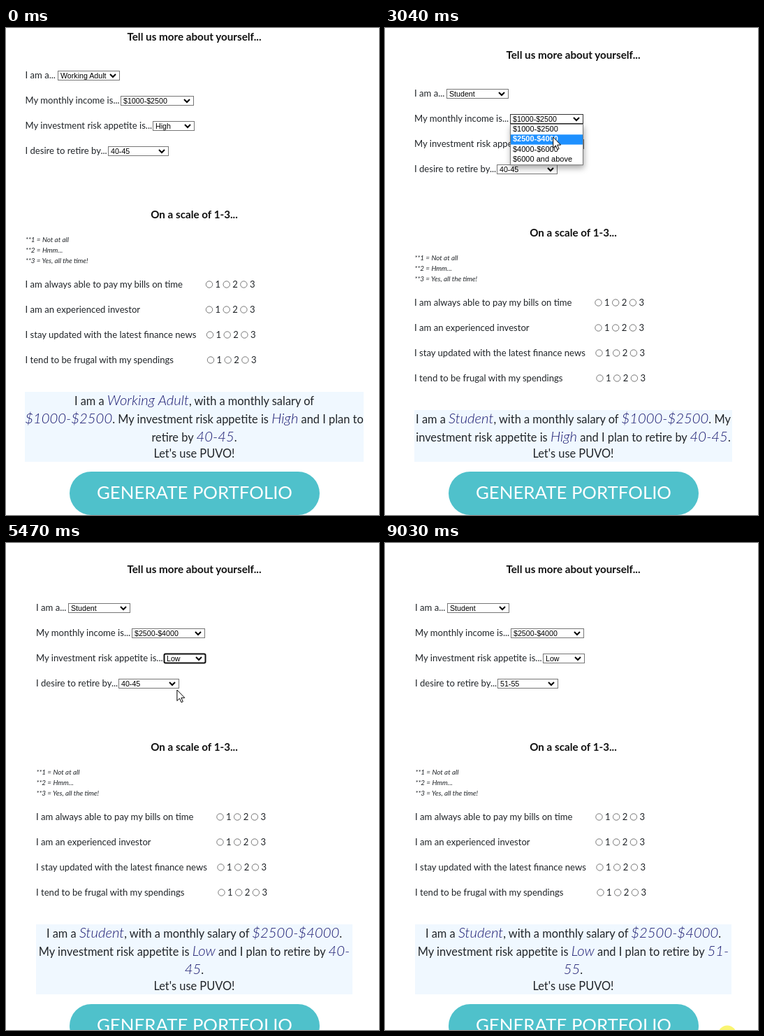
Recreate the animation shown at these times as an HTML page. Size 534 by 696 pixels, loop 9110 ms.

```html
<!DOCTYPE html>
<html lang="en">
<head>
<meta charset="utf-8">
<title>Portfolio form</title>
<style>
html, body { margin: 0; height: 100%; overflow: hidden; background: #fff; }
svg { display: block; width: 534px; height: 696px; font-family: Lato, sans-serif; fill: #212529; }
.head { font-size: 15.2px; font-weight: 700; text-anchor: middle; fill: #111; }
.label { font-size: 13.1px; }
.note { font-size: 9.9px; font-style: italic; }
.sum { font-size: 16.4px; text-anchor: middle; }
.sum tspan { font-size: 20.3px; font-style: italic; font-weight: 300; fill: #191970; }
.button { font-size: 25.8px; text-anchor: middle; fill: #fff; }
.value, .item { font: 10.67px "Liberation Sans", Arial, sans-serif; fill: #000; }
.item { font-size: 11px; }
.hot { font-weight: 700; fill: #fff; }
.menu { fill: #fff; stroke: #767676; filter: drop-shadow(1px 4px 4px rgba(0, 0, 0, .35)); }
</style>
</head>
<body>
<svg id="stage" viewBox="0 0 534 696"></svg>
<script>
const LOOP = 9110, CLICK_AWAY = 9030, PITCH = 36, ROW = 14.3;
const stage = document.getElementById('stage');

// grip: where across the menu the pointer rests; reach, open, close: times; choose: span of the move to the pick
const fields = [
  { label: 'I am a...', x: 74, w: 88, grip: .4, options: ['Working Adult', 'Student', 'Retiree'],
    pick: 1, reach: 470, open: 900, choose: [950, 1490], close: 1750 },
  { label: 'My monthly income is...', x: 164.5, w: 104, grip: .54, options: ['$1000-$2500', '$2500-$4000', '$4000-$6000', '$6000 and above'],
    pick: 1, reach: 2080, open: 2500, choose: [2600, 3300], close: 3360 },
  { label: 'My investment risk appetite is...', x: 210.5, w: 59, grip: .33, options: ['High', 'Medium', 'Low', 'Unsure'],
    pick: 2, reach: 3960, open: 4240, choose: [4770, 5050], close: 5270 },
  { label: 'I desire to retire by...', x: 146, w: 86, grip: .49, options: ['40-45', '46-50', '51-55', '55 and above'],
    pick: 2, reach: 5470, open: 5800, choose: [5950, 6480], close: 6880 }
];
const questions = [
  'I am always able to pay my bills on time',
  'I am an experienced investor',
  'I stay updated with the latest finance news',
  'I tend to be frugal with my spendings'
];
const notes = ['**1 = Not at all', '**2 = Hmm...', '**3 = Yes, all the time!'];

const text = (cls, x, y, s) => `<text class="${cls}" x="${x}" y="${y}">${s}</text>`;
const rect = (x, y, w, h, rest) => `<rect x="${x}" y="${y}" width="${w}" height="${h}" ${rest}/>`;
const em = s => `<tspan>${s}</tspan>`;

// The summary's wrapping decides the page's offset and the button's place
function layoutAt(t) {
  if (t < fields[0].close) return { dx: 0, dy: 0, left: 27, top: 520, button: 634 };
  if (t < fields[2].close) return { dx: 14.5, dy: 26, left: 42, top: 546, button: 634 };
  return { dx: 15.5, dy: 25, left: 43, top: 545, button: 659 };
}

const boxAt = (i, { dx, dy }) => [Math.floor(fields[i].x + dx), 61 + PITCH * i + dy];

// Pointer moves: start, end, x, y
const moves = [[130, 330, 8, 90]];
fields.forEach((f, i) => {
  const [x, y] = boxAt(i, layoutAt(f.reach));
  moves.push([f.reach, f.reach + 200, x + f.w - 11, y + 8]);
  moves.push([...f.choose, x + f.w * f.grip, y + 22 + ROW * f.pick]);
});
moves.push([7350, 7630, 245, 312], [7630, 7920, 404, 673], [8080, 8370, 475, 700]);

function pointerAt(t) {
  if (t < moves[0][0] || t >= moves.at(-1)[1]) return null;
  let x = 437, y = 567;
  for (const [start, end, toX, toY] of moves) {
    const k = Math.min(1, Math.max(0, (t - start) / (end - start)));
    const ease = 1 - (1 - k) ** 2;
    x += (toX - x) * ease;
    y += (toY - y) * ease;
  }
  return [x, y];
}

function select(i, t, layout, value) {
  const f = fields[i], [x, y] = boxAt(i, layout);
  const blur = i + 1 < fields.length ? fields[i + 1].open : CLICK_AWAY;
  const open = t >= f.open && t < f.close, focus = t >= f.close && t < blur;
  const frame = focus ? 'rx="2" stroke="#101010" stroke-width="2"' : `stroke="${open ? '#333' : '#767676'}"`;
  return rect(x + .5, y + .5, f.w, 13, 'fill="#fff" ' + frame) + text('value', x + 4, y + 11, value) +
    `<path d="M${x + f.w - 13} ${y + 5}l4 4l4 -4" fill="none" stroke="#000" stroke-width="2"/>`;
}

function menu(i, layout, pointer) {
  const f = fields[i], [x, boxY] = boxAt(i, layout), y = boxY + 14, n = f.options.length;
  const hot = Math.min(n - 1, Math.max(0, Math.floor((pointer[1] - y - 1) / ROW)));
  return rect(x + .5, y + .5, f.w, n * ROW + 1, 'class="menu"') +
    rect(x + 1, y + 1 + hot * ROW, f.w - 1, ROW, 'fill="#1e90ff"') +
    f.options.map((s, j) =>
      text(j === hot ? 'item hot' : 'item', x + 4, y + 11 + Math.round(j * ROW), s)).join('');
}

function summary([who, pay, risk, age], t) {
  const [from, to] = age.split('-');
  const end = "Let's use PUVO!";
  if (t < fields[0].close) return [
    `I am a ${em(who)}, with a monthly salary of`,
    `${em(pay)}. My investment risk appetite is ${em(risk)} and I plan to`,
    `retire by ${em(age)}.`, end];
  if (t < fields[2].close) return [
    `I am a ${em(who)}, with a monthly salary of ${em(pay)}. My`,
    `investment risk appetite is ${em(risk)} and I plan to retire by ${em(age)}.`, end];
  return [
    `I am a ${em(who)}, with a monthly salary of ${em(pay)}.`,
    `My investment risk appetite is ${em(risk)} and I plan to retire by ${em(from + '-')}`,
    `${em(to)}.`, end];
}

function draw(t) {
  const layout = layoutAt(t), { dx, dy, left, top, button } = layout;
  const pointer = pointerAt(t), x0 = 27.5 + dx;
  const values = fields.map(f => f.options[t < f.close ? 0 : f.pick]);
  let out = text('head', 269.5, 18 + dy, 'Tell us more about yourself...') +
    text('head', 269.5, 272 + dy, 'On a scale of 1-3...');

  fields.forEach((f, i) => {
    out += text('label', x0, 72 + PITCH * i + dy, f.label) + select(i, t, layout, values[i]);
  });
  notes.forEach((s, i) => out += text('note', x0 + .5, 306 + 15 * i + dy, s));
  questions.forEach((s, i) => {
    const y = 371 + PITCH * i + dy;
    out += text('label', x0, y, s);
    for (let n = 0; n < 3; n++) {
      const x = 291 + Math.max(0, i - 1) + dx + 24.7 * n;
      out += `<circle cx="${x}" cy="${y - 4.5}" r="4.7" fill="#fff" stroke="#767676"/>` +
        text('label', x + 8.5, y, n + 1);
    }
  });

  const lines = summary(values, t), last = lines.length - 1;
  out += rect(left, top, 539 - 2 * left, last * 26 + 22, 'fill="#f0f8ff"');
  lines.forEach((s, i) => out += text('sum', 269.5, top + 19 + 26 * i - (i === last ? 3 : 0), s));

  out += rect(91, button, 358, 62, 'rx="31" fill="#4fc1cb"') +
    text('button', 270, button + 39, 'GENERATE PORTFOLIO');

  fields.forEach((f, i) => {
    if (t >= f.open && t < f.close) out += menu(i, layout, pointer);
  });
  if (t >= CLICK_AWAY) out += '<circle cx="490" cy="702.5" r="13" fill="#faf572"/>';
  if (pointer) out += `<path transform="translate(${pointer})" fill="#fff" stroke="#000"
    d="M.5 .5V16l3.6 -3.4L6.6 18.2l2.3 -1L6.5 11.7H11.4Z"/>`;
  stage.innerHTML = out;
}

function tick() {
  draw(performance.now() % LOOP);
  requestAnimationFrame(tick);
}
tick();
</script>
</body>
</html>
```
